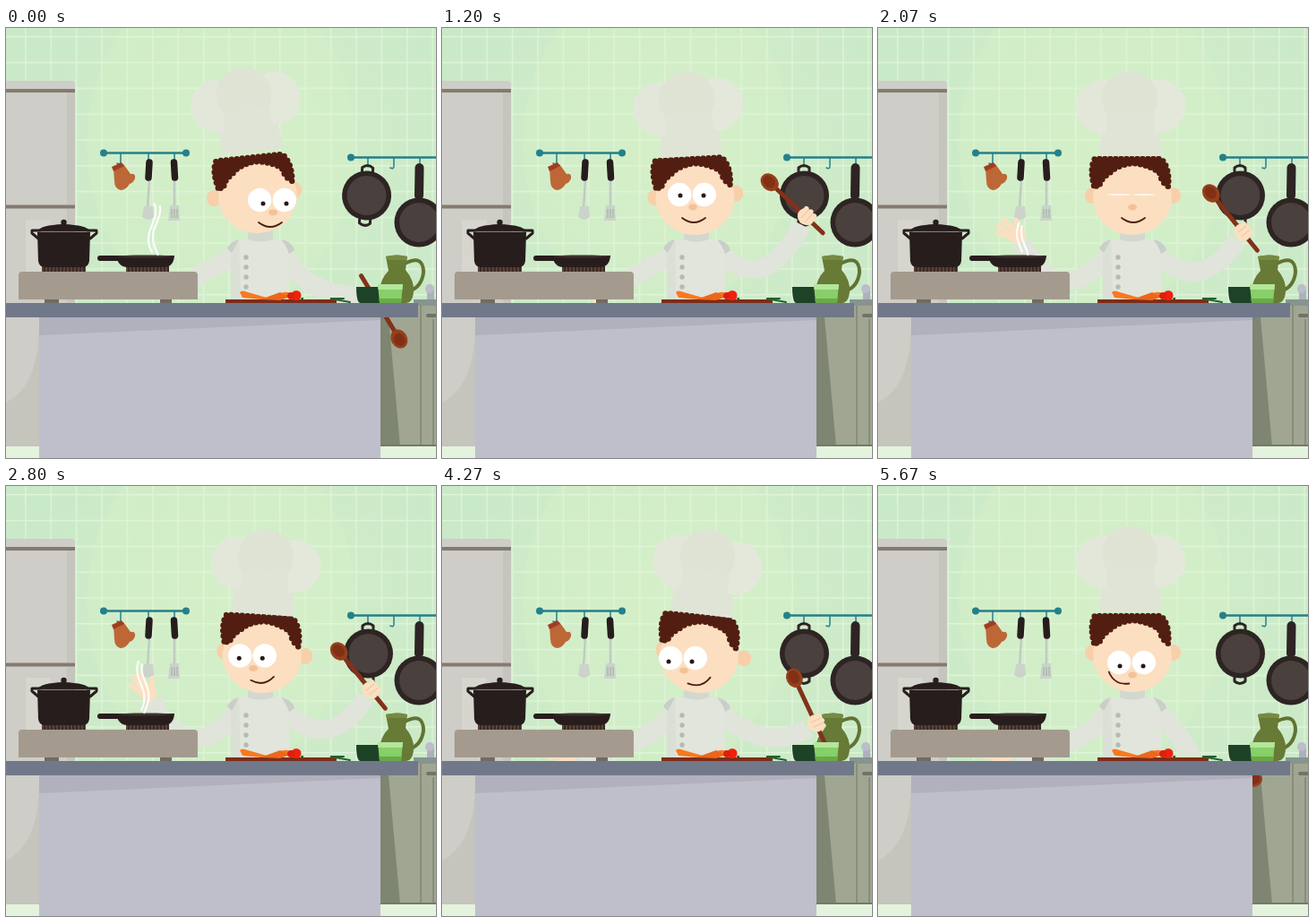
An HTML page that plays this animation: 480x480 px, repeating every 5.74 s.

```html
<!DOCTYPE html>
<html lang="en">
<head>
<meta charset="utf-8">
<title>Chef</title>
<style>
html, body { margin: 0; width: 100%; height: 100%; overflow: hidden; background: #cbeac8; }
svg { display: block; width: 100vw; height: 100vh; }
.line { fill: none; stroke-linecap: round; stroke-linejoin: round; }
.arm { fill: none; stroke: #e0e4da; stroke-width: 21; }
.skin { fill: #fbdfc0; }
.fingers { stroke: #fbdfc0; stroke-width: 5.5; }
.iron { fill: #271d1c; }
</style>
</head>
<body>
<svg viewBox="0 0 480 480">
  <defs>
    <radialGradient id="glow" gradientUnits="userSpaceOnUse" cx="270" cy="140" r="270">
      <stop offset="0" stop-color="#d4eec8"/><stop offset="1" stop-color="#c9e9c8"/>
    </radialGradient>
    <pattern id="tiles" x="21" y="9" width="28.4" height="28.8" patternUnits="userSpaceOnUse">
      <path d="M0 .8H29M.8 0V29" stroke="#dff4d7" stroke-width="1.4"/>
    </pattern>
    <g id="roundPan">
      <circle r="27.500" fill="#2d2423"/><circle r="22" fill="#4a403d"/>
    </g>
  </defs>
  <rect width="480" height="480" fill="url(#glow)"/>
  <ellipse cx="240" cy="130" rx="150" ry="190" fill="#d8f1c8" opacity=".3"/>
  <rect width="480" height="310" fill="url(#tiles)"/>
  <path d="M0 467H480V480H0Z" fill="#e4f3dd"/>

  <!-- fridge -->
  <path d="M0 59H73Q77 59 77 63V467H0Z" fill="#cecdc7"/>
  <path d="M68 72H77V197H68ZM68 202H77V307H68ZM37 323V467H0V418Q37 400 37 330Z" fill="#c5c4bd"/>
  <path d="M22 214H50V272H22Z" fill="#d6d6cf"/>
  <path d="M0 70H77M0 199.500H77" stroke="#847a70" stroke-width="4"/>

  <!-- left rack -->
  <g class="line" stroke="#24808a">
    <path d="M109 139.500H201" stroke-width="2.700"/>
    <path d="M128 140V149Q128 153 124 151M159 140V147M188 140V147" stroke-width="1.500"/>
  </g>
  <g fill="#24808a"><circle cx="109" cy="139.500" r="4"/><circle cx="201" cy="139.500" r="4"/></g>
  <path d="M120 156L131 152Q135 157 139 163Q145 162 144 168Q142 173 138 174Q134 181 128 181Q121 179 121 171Z" fill="#bd6737"/>
  <path d="M118 155L129 150L132 154L120 160Z" fill="#a23c22"/>
  <g class="line" stroke="#bfcbc2" stroke-width="2.500"><path d="M160 168L158 202M188 168V202"/></g>
  <g class="line" stroke="#271d1c" stroke-width="7.500"><path d="M160 150L159 167M187.500 150L188.500 167"/></g>
  <path d="M154 199H164L165 211Q159 217 152 211ZM183 198H193L194 215H181Z" fill="#cbd3cb"/>
  <path d="M185 202V212M188 202V212M191 202V212" stroke="#a5b7a6" stroke-width="1.300"/>

  <!-- right rack -->
  <g class="line" stroke="#24808a">
    <path d="M385 144.500H484" stroke-width="2.700"/>
    <path d="M404 145V155M433 145V154Q433 158 429 156M462 145V155" stroke-width="1.500"/>
  </g>
  <circle cx="385" cy="144.500" r="4" fill="#24808a"/>
  <g id="pan">
    <path class="line" d="M398 163V156Q404 151 410 156V163M398 211V218Q404 223 410 218V211" stroke="#2d2423" stroke-width="3"/>
    <use href="#roundPan" x="404.500" y="187"/>
  </g>
  <path class="line" d="M461.500 156L461 187" stroke="#2d2423" stroke-width="10"/>
  <use href="#roundPan" x="461" y="217"/>

  <!-- cabinet -->
  <path d="M418 307H480V467H418Z" fill="#a0a692"/>
  <path d="M418 323H427L440 467H418Z" fill="#7e8571"/>
  <path d="M463 310V467M477 325V467" stroke="#7f8674" stroke-width="1.500"/>
  <path d="M455 303H480V310H455Z" fill="#87948f"/>
  <path class="line" d="M471 321H480" stroke="#6e7566" stroke-width="4"/>
  <path d="M418 466H480" stroke="#737a69" stroke-width="2"/>
  <path d="M470 293H478V303H470Z" fill="#aeb0bf"/><circle cx="473" cy="291" r="5" fill="#bcbccb"/>

  <!-- jug -->
  <path class="line" d="M445 263Q466 252 466 273Q464 289 450 294" stroke="#627332" stroke-width="4"/>
  <path d="M424 255Q437 252 448 255L446 270Q456 282 455 294Q454 307 446 307H425Q417 304 417 293Q418 280 427 271Z" fill="#677a36"/>
  <path d="M424 255Q437 252 448 255L447 259H426Z" fill="#768a43"/>

  <!-- chef -->
  <path id="leftArm" class="arm"/>
  <path id="rightArm" class="arm"/>
  <g id="leftHand">
    <circle r="9.500" class="skin"/>
    <path class="line fingers" d="M3 -6L18 -11M5 -2L23 -4M5 3L22 4M0 5L11 13"/>
  </g>
  <path d="M251 243Q252 236 260 236H307Q316 236 316 245V306H251Z" fill="#e1e5db"/>
  <path d="M251 243Q252 236 260 236L262 306H251Z" fill="#dbe0d6"/>
  <path d="M307 236Q319 238 322 248L316 252Q313 243 307 236ZM260 236Q250 239 247 246L252 251Z" fill="#c9cfc8"/>
  <path class="line" d="M268 256V290" stroke="#b4bab6" stroke-width="5.400" stroke-dasharray="0 11"/>
  <path d="M270 226H298V236Q284 241 270 236Z" fill="#d3d8cf"/>
  <g id="head">
    <g id="ears" fill="#f7cfa9"><ellipse cx="239" cy="187" rx="8" ry="9"/><ellipse cx="330" cy="187" rx="8" ry="9"/></g>
    <ellipse cx="284" cy="190" rx="44" ry="41" class="skin"/>
    <path class="line" d="M241 176Q236 156 242 146H316Q326 156 324 177Q316 172 314 161Q300 152 284 151Q264 154 258 163Q249 167 247 177Z"
      style="fill:#531e12" stroke="#531e12" stroke-width="6.500" stroke-dasharray="0 6"/>
  </g>
  <g id="hat">
    <path d="M251 95H313L317 143H247Z" fill="#e0e4d7"/>
    <circle cx="250" cy="88" r="29.500" fill="#e3e7da"/><circle cx="314" cy="87" r="29.500" fill="#e4e8da"/>
    <circle cx="281" cy="79" r="31" fill="#dfe3d4"/>
    <path d="M256 96H308L309 121H255Z" fill="#e0e4d7"/>
  </g>
  <g id="face">
    <g id="eyes">
      <g fill="#fff"><circle cx="-13.800" r="13.200"/><circle cx="13.800" r="13.200"/></g>
      <g id="pupils" fill="#2a1712"><circle cx="-13" r="2.500"/><circle cx="13" r="2.500"/></g>
    </g>
    <ellipse cx="1" cy="14" rx="5" ry="3.500" fill="#f5c197"/>
  </g>
  <path id="mouth" class="line" d="M-13 0Q0 10 13 0" stroke="#4d1d12" stroke-width="1.800"/>
  <g id="spoon">
    <path class="line" d="M-26 0H48" stroke="#83311a" stroke-width="5"/>
    <ellipse cx="56" rx="11" ry="9" fill="#94401d"/><ellipse cx="57" rx="7.500" ry="6" fill="#823015"/>
  </g>
  <g id="rightHand">
    <ellipse rx="10" ry="9" class="skin"/>
    <path class="line fingers" d="M-6 -7L-5 3M0 -8V3M6 -7V3"/>
    <path class="line" d="M-3 -7V4M3 -7V4" stroke="#edc5a5" stroke-width="1"/>
  </g>

  <!-- stove, pot and frying pan -->
  <path d="M43 302H59V308H43ZM172 302H185V308H172Z" fill="#716b62"/>
  <path d="M18 272H210Q214 272 214 276V303H14V276Q14 272 18 272Z" fill="#a49b8e"/>
  <path d="M40 266H89V272H40ZM134 266H182V272H134Z" fill="#3a2925"/>
  <path d="M40 269H89M134 269H182" stroke="#5a4239" stroke-width="6" stroke-dasharray="2 2"/>
  <path class="line" d="M38 226H29V229L36 235M91 226H101V229L94 235" stroke="#271d1c" stroke-width="3"/>
  <path class="iron" d="M35 228H94L93 260Q92 267 86 267H43Q37 267 36 260ZM35 227Q38 220 64 219Q91 220 94 227Z"/>
  <path d="M35 227H94" stroke="#3d3130" stroke-width="1"/>
  <circle class="iron" cx="64.500" cy="217" r="3.200"/>
  <path class="line" d="M105 257H127" stroke="#271d1c" stroke-width="6"/>
  <path class="iron" d="M123 254H188Q187 267 176 267H136Q125 267 123 254Z"/>
  <ellipse cx="155.500" cy="255" rx="32" ry="1.500" fill="#3d3130"/>

  <!-- counter -->
  <path d="M37 323H418V480H37Z" fill="#bebfca"/>
  <path d="M37 323H418V326L37 343Z" fill="#b1b0bd"/>
  <path d="M0 307H460V323H0Z" fill="#70788a"/>

  <!-- board and cups -->
  <path d="M245 303H369V307H245Z" fill="#7c2d1a"/>
  <path d="M261 295Q263 292 270 295L291 301L310 295Q318 294 317 300L306 303H286L264 301Z" fill="#f9791f"/>
  <path d="M284 303L306 295L317 300L306 304Z" fill="#ee661a"/>
  <circle cx="324" cy="298.500" r="5.500" fill="#f3200f"/><circle cx="318" cy="299" r="4" fill="#dd200c"/>
  <path class="line" d="M330 302H362L384 306M362 302L377 302" stroke="#23612f" stroke-width="2"/>
  <path d="M332 302H362" stroke="#dbe9c8" stroke-width="2"/>
  <path d="M391 289H417V307H395Q391 305 391 289Z" fill="#1d4227"/>
  <path d="M415 286H443L441 307H417Z" fill="#87cf68"/>
  <path d="M415 286H443L442.500 292H415.500Z" fill="#b4e69b"/>
  <path d="M416.500 302H441.500L441 307H417Z" fill="#6aa94a"/>

  <g id="steam" class="line" stroke="#fff" stroke-width="2.200" opacity=".9"><path/><path/></g>
</svg>
<script>
const LOOP = 5740;
const { sin, cos, exp, abs, max, min, hypot, PI } = Math;
const $ = id => document.getElementById(id);
const place = (id, x, y, turn = '') => $(id).setAttribute('transform', `translate(${x} ${y}) ${turn}`);

// The motion falls into beats: lift, tip the spoon, waft, rest, put away.
function beats(t) {
  const ramp = (from, to) => {
    const u = min(1, max(0, (t - from) / (to - from)));
    return u * u * (3 - 2 * u);
  };
  const lift = ramp(0, 600), wave = ramp(1200, 2070), turn = ramp(2070, 3400);
  const rest = ramp(3400, 4270), nod = ramp(4270, 5670);
  return { ramp, lift, wave, turn, rest, nod, raised: wave - rest, sway: ramp(600, 1200) - wave };
}

function drawArm(id, sx, sy, ex, ey, hx, hy) {
  const d = hypot(ex - hx, ey - hy);
  const wx = hx + (ex - hx) / d * 10, wy = hy + (ey - hy) / d * 10;
  $(id).setAttribute('d', `M${sx} ${sy}Q${ex} ${ey} ${wx} ${wy}`);
}

function drawHead(t, { lift, turn, nod, sway }) {
  const gaze = 1 - lift - turn + nod;
  const side = abs(gaze), lean = gaze + sway * .5;
  const open = max(.05, min(1, (abs(t - 2070) - 30) / 90));
  place('hat', -7 * lean, -5 * max(0, gaze) - 3 * nod, `rotate(${-7.5 * lean} 282 144)`);
  place('head', -3 * lean, -2 * max(0, gaze) - nod, `rotate(${-6 * lean} 284 190)`);
  place('ears', -4 * gaze, 0);
  place('face', 283 + 14 * gaze - 4 * sway, 186 + 6 * side + 11 * nod);
  place('eyes', 0, 0, `scale(1 ${open})`);
  place('pupils', 3 * gaze, 1 + 3 * max(side, nod));
  $('pupils').style.display = open < .2 ? 'none' : '';
  place('mouth', 285 + 6 * side + 4 * gaze - 4 * sway - 16 * nod, 212 + 5 * side + 2 * nod,
    `rotate(${30 * nod - 15 * max(0, -gaze)})`);
}

function drawRightArm({ ramp, lift, rest, nod }) {
  const x = 410 - 16 * lift + 13 * ramp(600, 1300) + 10 * rest - 55 * ramp(4270, 5200);
  const y = 299 - 98 * lift + 27 * ramp(600, 2070) + 37 * rest + 75 * ramp(4270, 5000) - 14 * ramp(5300, 5670);
  const angle = 59 + 124 * lift + 48 * ramp(600, 1400) + 14 * rest + 116 * ramp(4800, 5600);
  drawArm('rightArm', 308, 250, 335 + 25 * (lift - nod), 300 - 30 * nod, x, y);
  place('spoon', x, y, `rotate(${angle})`);
  place('rightHand', x, y, `rotate(${angle - 180})`);
}

function drawLeftArm({ ramp, raised, rest, turn }) {
  const waft = sin(turn * 4 * PI);
  const x = 192 - 37 * ramp(1000, 2070) - 13 * rest + 5 * waft;
  const y = 294 - 63 * raised + 5 * rest;
  drawArm('leftArm', 260, 252, 215 - 15 * raised, 275 + 43 * raised + 25 * rest, x, y);
  place('leftHand', x, y, `rotate(${180 + 37 * raised + 13 * (turn - rest) + 12 * waft})`);
}

function drawSteam(t, { ramp, turn }) {
  const early = t < 1000;
  const x = early ? 166 : 162 - 15 * turn;
  const top = 250 - 56 * (early ? 1 : ramp(1900, 2200));
  const bottom = 250 - 56 * (early ? ramp(0, 350) : ramp(3500, 3800));
  [...$('steam').children].forEach((path, n) => {
    const points = [];
    for (let y = bottom; y > top; y -= 2)
      points.push([x - 3 + n * 5 + 4 * sin(y / 10 + n * .5 + t / 300), y + n * 3]);
    path.setAttribute('d', points.length ? 'M' + points.join('L') : '');
  });
}

const start = performance.now();
function frame() {
  const t = (performance.now() - start) % LOOP, b = beats(t);
  drawHead(t, b);
  drawRightArm(b);
  drawLeftArm(b);
  drawSteam(t, b);
  place('pan', 0, 0, `rotate(${3 * exp(-t / 200) * cos(t / 100)} 404 150)`);
  requestAnimationFrame(frame);
}
frame();
</script>
</body>
</html>
```
